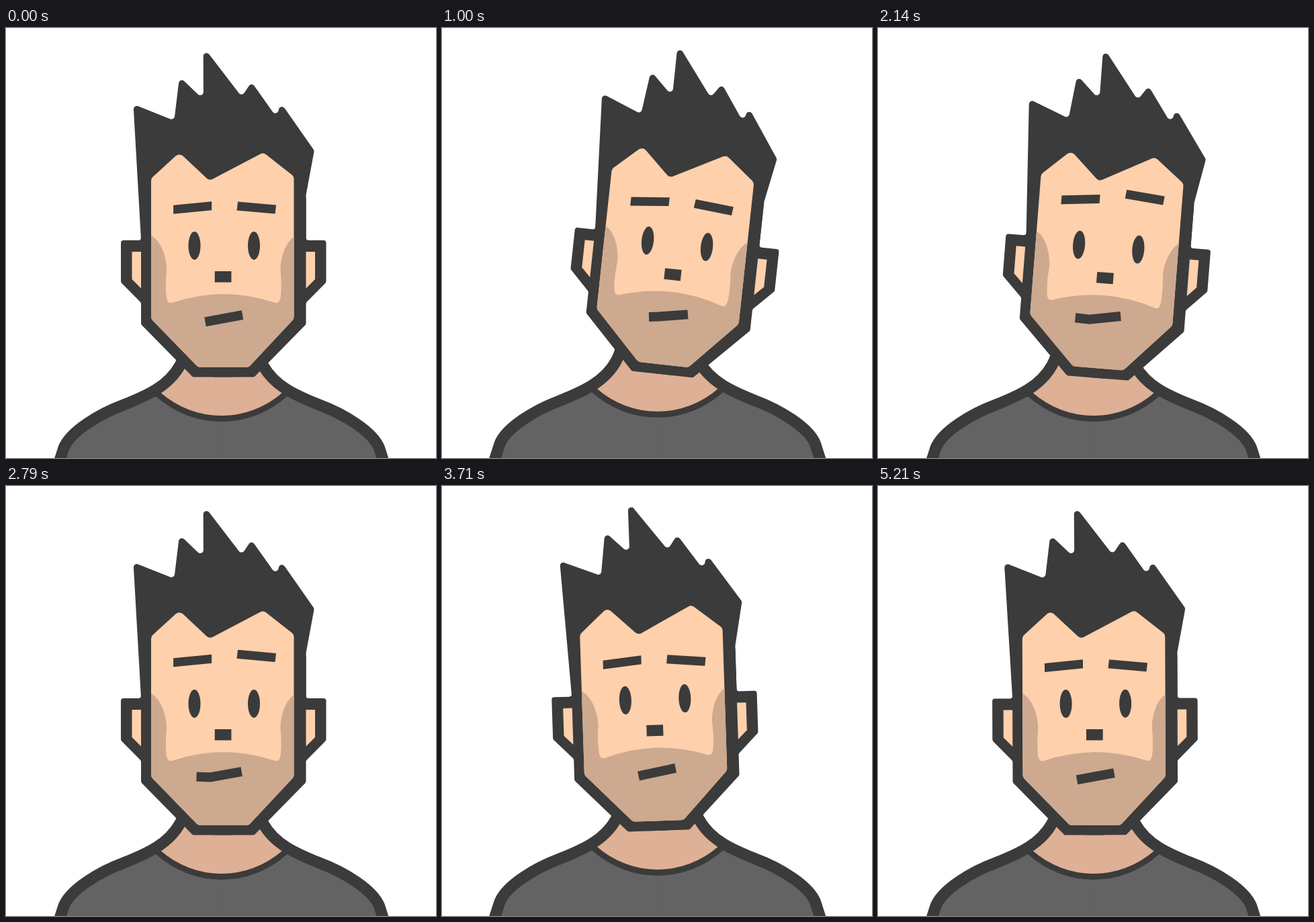
An HTML page with a canvas that plays this animation: 640 by 640 pixels, repeating every 5.28 s.

```html
<!DOCTYPE html>
<html lang="en">
<head>
<meta charset="utf-8">
<title>Curious head</title>
<style>
  html, body { margin: 0; height: 100%; overflow: hidden; background: #fff; }
  canvas { display: block; width: 100vw; height: 100vh; }
</style>
</head>
<body>
<canvas id="stage" width="640" height="640"></canvas>
<script>
const ctx = document.getElementById('stage').getContext('2d');
const LOOP = 5280;
const DARK = '#3b3b3b', SKIN = '#ffd0ac', NECK = '#deb095', SHIRT = '#636363', BEARD = '#cda98f';
const BODY_AXIS = 320.75, HEAD_AXIS = 323.75;
const PIVOT = { x: 307, y: 561 };

// Closed polygon with every corner rounded by the same radius.
function rounded(radius, points) {
  const path = new Path2D();
  const middle = (a, b) => [(a[0] + b[0]) / 2, (a[1] + b[1]) / 2];
  path.moveTo(...middle(points[points.length - 1], points[0]));
  points.forEach((point, i) => {
    const next = points[(i + 1) % points.length];
    path.arcTo(...point, ...middle(point, next), radius);
  });
  path.closePath();
  return path;
}

// Symmetric parts are described by their left half only.
const halfSkull = rounded(4, [
  [340, 250], [201, 250], [201, 316], [171, 316], [171, 378.5],
  [201, 409], [201, 441], [278, 519.5], [340, 519.5]
]);
const hair = rounded(4.8, [
  [189.5, 113.6], [250.3, 137.7], [258.2, 72.5], [293.9, 106.5], [293.6, 27.8],
  [350.8, 102.2], [365.4, 80.4], [403, 133.5], [408.5, 110.6],
  [458.8, 182.5], [446.6, 248], [446.6, 322], [201.4, 322]
]);
const face = rounded(8, [
  [216, 223.8], [258, 185.5], [302.7, 227.4], [383.2, 185.2], [428.5, 221],
  [428.5, 433], [361, 505], [286, 505], [216, 433]
]);
const earInside = new Path2D('M187.5 333 H201 V387.5 L187.5 374 Z');
const halfBeard = new Path2D(`M210 306 C230 312 239 340 239 360
  C238 372 237 387 239 402 Q241 411 247 409 Q285 396 325 396 V520 H210 Z`);

const contour = 'M76 656 L86 625 C96 600 140 574 175 561 C210 547 242 533 259 502 Q266 489 268 475';
const shoulder = new Path2D(contour);
const halfTorso = new Path2D(contour + ' H322 V656 Z');
const collarArc = 'M226 545 C281 593.6 360.5 593.6 415.5 545';
const collar = new Path2D(collarArc);
const neck = new Path2D(collarArc + ' Q376 523 373 475 H268 Q266 523 226 545 Z');

const mix = (a, b, k) => a + (b - a) * k;
const progress = (t, start, end) => Math.min(1, Math.max(0, (t - start) / (end - start)));
const sine = p => (1 - Math.cos(Math.PI * p)) / 2;
const cubic = p => p < .5 ? 4 * p ** 3 : 1 - 4 * (1 - p) ** 3;

const breath = t => cubic(progress(t, 0, 750)) - cubic(progress(t, 1000, 2000));
const pulse = (t, up, upEnd, down, downEnd) =>
  sine(progress(t, up, upEnd)) - sine(progress(t, down, downEnd));

// Degrees: lean right, swing over to the left, drift back upright.
const headAngle = t =>
  7 * sine(progress(t, 0, 1290))
  - 9 * sine(progress(t, 1450, 3400))
  + 2 * progress(t, 3400, 5360) ** 1.4;

function fill(path, color) {
  ctx.fillStyle = color;
  ctx.fill(path);
}

function bothSides(axis, draw) {
  draw();
  ctx.save();
  ctx.transform(-1, 0, 0, 1, 2 * axis, 0);
  draw();
  ctx.restore();
}

function drawBody() {
  bothSides(BODY_AXIS, () => fill(halfTorso, SHIRT));
  fill(neck, NECK);
  ctx.strokeStyle = DARK;
  ctx.lineWidth = 9;
  ctx.stroke(collar);
  ctx.lineWidth = 17;
  bothSides(BODY_AXIS, () => ctx.stroke(shoulder));
}

function drawBrow(x, slope, lean, raise) {
  ctx.save();
  ctx.transform(1, slope, lean, 1, x, 267.5 - raise);
  ctx.fillRect(-28.5, -6.5, 57, 13);
  ctx.restore();
}

function drawMouth(smirk) {
  ctx.beginPath();
  ctx.moveTo(mix(296.5, 283.5, smirk), mix(437.3, 432.7, smirk));
  ctx.lineTo(mix(310, 304.5, smirk), mix(434.8, 433.4, smirk));
  ctx.lineTo(mix(352, 350.7, smirk), mix(427.2, 425.2, smirk));
  ctx.lineWidth = 14;
  ctx.stroke();
}

function drawHead(browRaise, smirk) {
  fill(hair, DARK);
  bothSides(HEAD_AXIS, () => {
    fill(halfSkull, DARK);
    fill(earInside, SKIN);
  });
  fill(face, SKIN);
  ctx.save();
  ctx.clip(face);
  bothSides(HEAD_AXIS, () => fill(halfBeard, BEARD));
  ctx.restore();

  ctx.fillStyle = ctx.strokeStyle = DARK;
  for (const x of [280.5, 369]) {
    ctx.beginPath();
    ctx.ellipse(x, 324, 9, 21, 0, 0, 2 * Math.PI);
    ctx.fill();
  }
  ctx.fillRect(310.7, 362, 24.7, 16.5);
  drawBrow(277.6, -.098, 0, 11 * browRaise);
  drawBrow(372.8, .092, -.12, 21.5 * browRaise);
  drawMouth(smirk);
}

function frame(t) {
  const lift = 6.1 * (breath(t) + breath(t - 3070));

  ctx.clearRect(0, 0, 640, 640);
  ctx.save();
  ctx.translate(0, -lift);
  drawBody();
  ctx.translate(PIVOT.x, PIVOT.y);
  ctx.rotate(headAngle(t) * Math.PI / 180);
  ctx.translate(-PIVOT.x, -PIVOT.y);
  drawHead(pulse(t, 900, 1300, 2600, 3100), pulse(t, 900, 1300, 2790, 3200));
  ctx.restore();
}

const start = performance.now();
function tick() {
  frame((performance.now() - start) % LOOP);
  requestAnimationFrame(tick);
}
tick();
</script>
</body>
</html>
```
